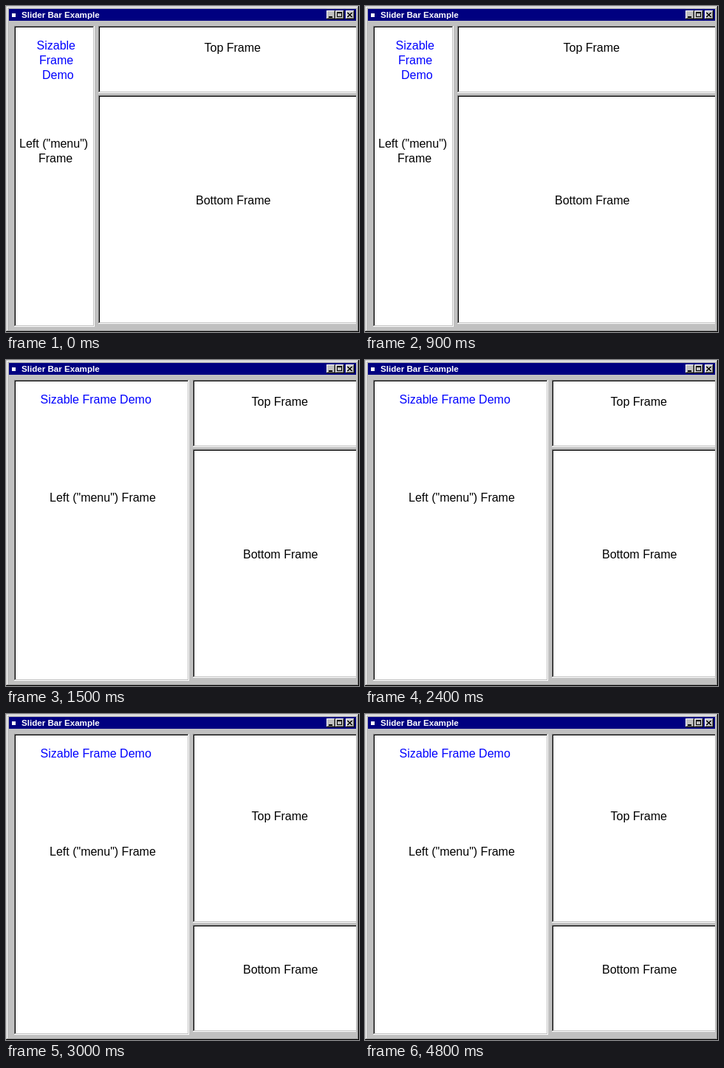
An HTML page with a canvas that plays this animation: 478 px wide and 442 px high, repeating every 6 s.

```html
<!DOCTYPE html>
<html lang="en">
<head>
<meta charset="utf-8">
<title>Slider Bar Example</title>
<style>
html, body { margin: 0; width: 100%; height: 100%; overflow: hidden; background: #c0c0c0; }
canvas { display: block; }
</style>
</head>
<body>
<canvas id="stage" width="478" height="442"></canvas>
<script>
const ctx = document.getElementById('stage').getContext('2d');
const GRAY = '#c0c0c0', SHADOW = '#808080', NAVY = '#000080';
const LOOP = 6000, RIGHT = 474;

function rect(x, y, w, h, color) {
  ctx.fillStyle = color;
  ctx.fillRect(x, y, w, h);
}

// Two-pixel bevel: outer and inner top-left colours, then bottom-right ones.
function bevel(x, y, w, h, [outerTL, innerTL, innerBR, outerBR], face) {
  rect(x, y, w, h, outerBR);
  rect(x, y, w - 1, h - 1, outerTL);
  rect(x + 1, y + 1, w - 2, h - 2, innerBR);
  rect(x + 1, y + 1, w - 3, h - 3, innerTL);
  rect(x + 2, y + 2, w - 4, h - 4, face);
}

function text(str, x, y, color = '#000', font = '16px') {
  ctx.fillStyle = color;
  ctx.font = `${font} "Liberation Sans", Arial, sans-serif`;
  ctx.fillText(str, x, y);
}

function panel(x, y, right, bottom) {
  bevel(x, y, right - x, bottom - y, [SHADOW, '#000', GRAY, '#fff'], '#fff');
}

function button(x) {
  bevel(x, 6, 12, 12, ['#fff', GRAY, SHADOW, '#000'], GRAY);
}

function drawWindow() {
  bevel(0, 0, 478, 442, [GRAY, '#fff', SHADOW, '#000'], GRAY);
  rect(4, 4, 470, 16, NAVY);
  rect(8, 10, 5, 5, '#fff');
  text('Slider Bar Example', 21, 16, '#fff', 'bold 11.6px');

  [434, 446, 460].forEach(button);
  rect(437, 14, 5, 2, '#000');
  rect(448, 8, 7, 7, '#000');
  rect(449, 10, 5, 4, GRAY);
  for (let i = 0; i < 6; i++) {
    rect(462 + i, 9 + i, 2, 1, '#000');
    rect(467 - i, 9 + i, 2, 1, '#000');
  }
}

function draw(now) {
  const t = now % LOOP;
  const wide = t >= 1500, tall = t >= 3000;
  const splitX = wide ? 248 : 120;
  const splitY = tall ? 283 : 118;

  drawWindow();
  panel(11, 27, splitX, 435);
  if (wide) {
    text('Sizable Frame Demo', 46.5, 59, '#00f');
    text('Left ("menu") Frame', 59, 192);
  } else {
    text('Sizable', 41.5, 59, '#00f');
    text('Frame', 45, 79, '#00f');
    text('Demo', 49, 99, '#00f');
    text('Left ("menu")', 18, 192);
    text('Frame', 44, 212);
  }

  // The right-hand panels run on under the window border.
  ctx.save();
  ctx.beginPath();
  ctx.rect(0, 0, RIGHT, 442);
  ctx.clip();
  panel(splitX + 5, 27, RIGHT + 4, splitY);
  panel(splitX + 5, splitY + 3, RIGHT + 4, 431);
  ctx.restore();

  const shift = wide ? 64 : 0;
  text('Top Frame', 268.5 + shift, tall ? 144 : 62);
  text('Bottom Frame', 257 + shift, tall ? 352 : 269);
}

const start = performance.now();
function tick() {
  draw(performance.now() - start);
  requestAnimationFrame(tick);
}
tick();
</script>
</body>
</html>
```
